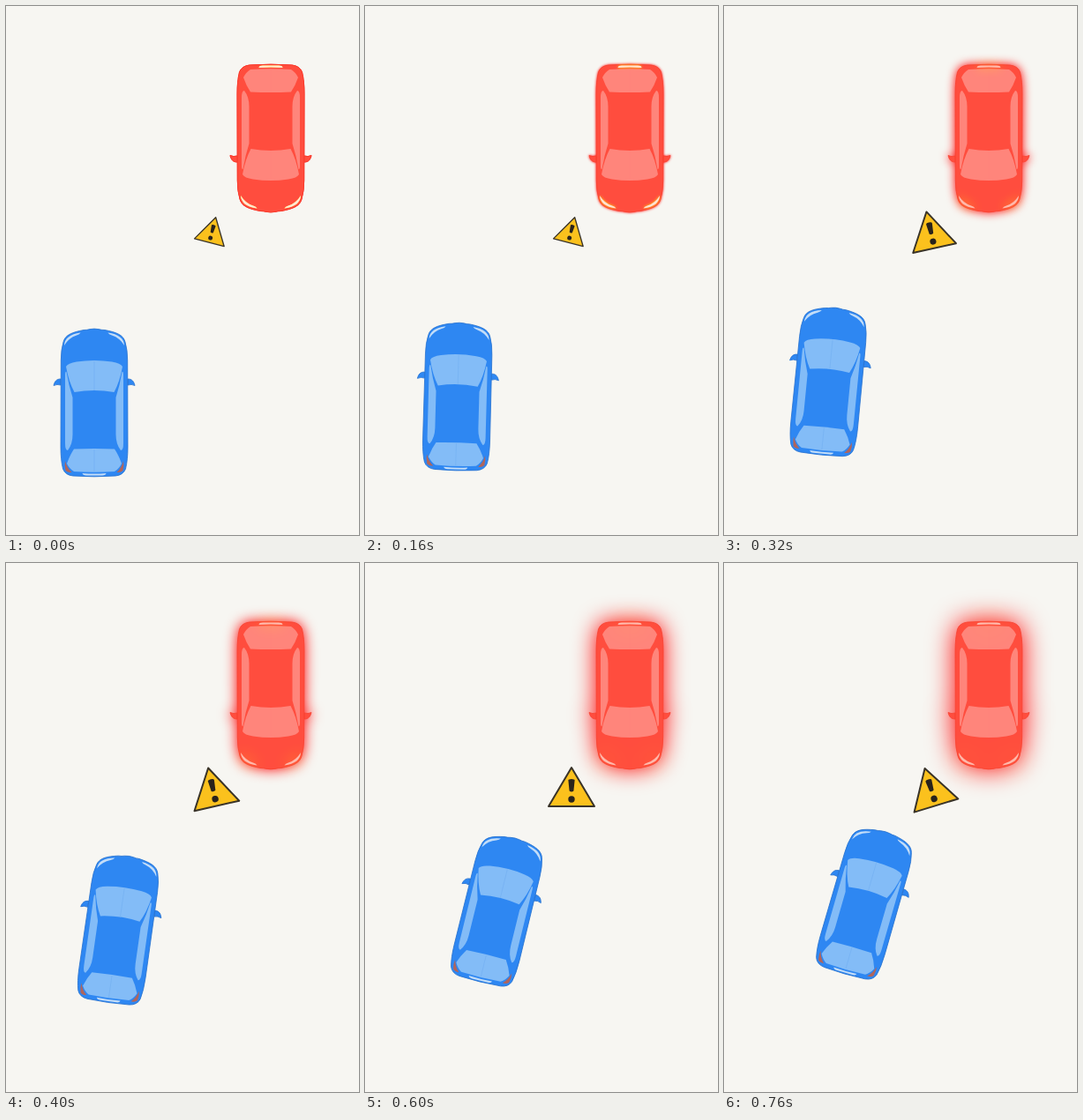
Animation, 400 px wide and 600 px high, one loop 800 ms. Source, as an HTML page:

```html
<!DOCTYPE html>
<html lang="en">
<head>
<meta charset="utf-8">
<title>Collision warning</title>
<style>
  html, body { margin: 0; width: 100%; height: 100%; overflow: hidden; background: #f7f6f2; }
  svg { display: block; width: 400px; height: 600px; }
  .blue { --body: #2e87f2; --edge: #2872cf; --glass: #83bcf7; --lamp: #c3ddf8; --tail: #b0655c; --seam: #75b1f2; }
  .red { --body: #ff4d3e; --edge: #f8402f; --glass: #ff857b; --lamp: #fff3e6; --tail: #ff4d3e; --seam: #ff857b; }
  .body { fill: var(--body); stroke: var(--edge); stroke-width: .8; }
  .glass { fill: var(--glass); }
  .lamp { fill: var(--lamp); }
  .tail { fill: var(--tail); }
  .seam { stroke: var(--seam); stroke-width: .7; }
</style>
</head>
<body>
<svg viewBox="0 0 400 600">
  <defs>
    <filter id="halo" filterUnits="userSpaceOnUse" x="-110" y="-150" width="220" height="300" color-interpolation-filters="sRGB">
      <feDropShadow class="blur" dx="0" dy="0" stdDeviation="0" flood-color="#f00"/>
    </filter>
    <filter id="beam" filterUnits="userSpaceOnUse" x="-110" y="-150" width="220" height="300" color-interpolation-filters="sRGB">
      <feDropShadow class="blur" dx="0" dy="0" stdDeviation="0" flood-color="#ff0"/>
    </filter>
  </defs>
  <g class="red" transform="translate(300 150) rotate(180)"></g>
  <g class="blue"></g>
  <g id="sign">
    <path d="M0-22 L26 22 H-26Z" fill="#fbc11d" stroke="#393328" stroke-width="2" stroke-linejoin="round"/>
    <path d="M-3.6-7.5 Q-3.4-9 0-9 T3.6-7.5 L2.4 4.5 Q0 6.3 -2.4 4.5Z" fill="#29231b"/>
    <circle cy="14" r="3.7" fill="#29231b"/>
  </g>
</svg>
<script>
const LOOP = 800, STEP = 40;
const $ = s => document.querySelector(s);

const shell = `
  <path class="body" d="M-38-27 C-43-27 -45-24 -46-19.5 Q-42-21.5 -38-20Z M38-27 C43-27 45-24 46-19.5 Q42-21.5 38-20Z"/>
  <path class="body" d="M-12-82.5 Q-8-82.5 -5-83.4 Q0-84.4 5-83.4 Q8-82.5 12-82.5
    C25-80 33-77 35-69 Q37.7-60 37.7-48 L38 50 Q38 65 35.5 75 Q33 82 24 83 Q0 84.6 -24 83
    Q-33 82 -35.5 75 Q-38 65 -38 50 L-37.7-48 Q-37.7-60 -35-69 C-33-77 -25-80 -12-82.5Z"/>`;

const half = `
  <path class="glass" d="M-31.5-35 Q-33-36 -33-32 V46 Q-33 54 -30 54 Q-24.5 47 -24.5 36 V-6 Q-29-20 -31.5-35Z"/>
  <path class="tail" d="M-33 66 Q-34 71 -32.5 77 Q-30 79.5 -25.5 79 Q-31 74 -33 66Z"/>`;

const headlamp = `<path class="lamp" d="M-34-65 Q-33.5-77 -15.5-79.5 Q-16.5-77.5 -20-76.5 Q-29-73.5 -34-65Z"/>`;

const flip = part => part + `<g transform="scale(-1 1)">${part}</g>`;

const car = `<g class="shell">${shell}</g>${flip(half)}
  <path class="glass" d="M-32-41 Q-30-45 -20-46.5 Q0-49.5 20-46.5 Q30-45 32-41 Q29-24 22.5-12 Q0-16 -22.5-12 Q-29-24 -32-41Z"/>
  <path class="glass" d="M-23 52.5 Q0 51.5 23 52.5 Q28 60 31 69 Q28 75 23 78 Q0 79.5 -23 78 Q-28 75 -31 69 Q-28 60 -23 52.5Z"/>
  <path class="seam" d="M0-47.5 V-14 M0 53 V78"/>
  <g class="lamps">${flip(headlamp)}
    <path class="lamp" d="M-13.5 80 Q0 81 13.5 80 Q13 82.4 9 82.4 H-9 Q-13 82.4 -13.5 80Z"/>
  </g>`;

const red = $('.red'), blue = $('.blue'), sign = $('#sign');
red.innerHTML = blue.innerHTML = car;
red.querySelector('.shell').setAttribute('filter', 'url(#halo)');
const lamps = red.querySelector('.lamps');
lamps.setAttribute('filter', 'url(#beam)');
const blurs = document.querySelectorAll('.blur');

const swing = [[0, 14.5], [160, 14.5], [320, -12.5], [360, -14.5], [400, -12.8],
  [520, 17], [600, 0], [680, -14], [760, -17], [800, -17]];
const growth = [[0, .667], [160, .667], [320, .96], [400, 1], [800, 1]];

const ease = p => (1 - Math.cos(Math.PI * p)) / 2;

function at(keys, t) {
  const i = keys.findIndex(k => k[0] > t);
  const [t0, v0] = keys[i - 1], [t1, v1] = keys[i];
  return v0 + (v1 - v0) * ease((t - t0) / (t1 - t0));
}

function draw(t) {
  const e = ease(t / LOOP);
  const x = 100 + 50 * e + 10 * e * e;
  const y = 450 - 73 * e + 8 * e * e;
  blue.setAttribute('transform', `translate(${x} ${y}) rotate(${16.2 * e})`);
  blurs.forEach(b => b.setAttribute('stdDeviation', 15 * e));
  lamps.setAttribute('opacity', .92 - .27 * Math.min(1, 3 * e * e * 3));
  sign.setAttribute('transform', `translate(234 254) rotate(${at(swing, t)}) scale(${at(growth, t)})`);
}

const start = performance.now();
function tick() {
  const t = (performance.now() - start) % LOOP;
  draw(Math.floor(t / STEP) * STEP);
  requestAnimationFrame(tick);
}
draw(0);
requestAnimationFrame(tick);
</script>
</body>
</html>
```
